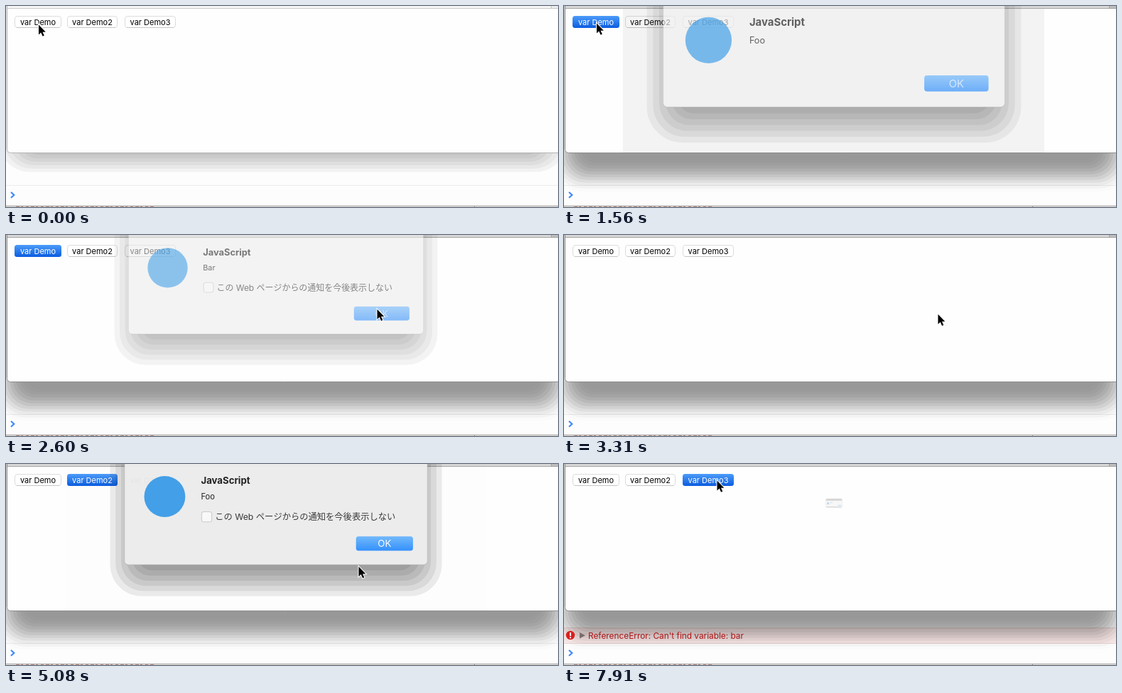
Write an HTML page with a canvas that moves like this. It is 777x284 px and loops after 8000 ms.

```html
<!DOCTYPE html>
<html lang="ja">
<head>
<meta charset="utf-8">
<title>var demo</title>
<style>
  html, body { margin: 0; width: 100%; height: 100%; overflow: hidden; background: #fdfdfd; }
  canvas { display: block; width: 777px; height: 284px; }
</style>
</head>
<body>
<canvas id="stage" width="777" height="284"></canvas>
<script>
const ctx = document.getElementById('stage').getContext('2d');
const W = 777, H = 284, LOOP = 8000;
const FONT = 'Inter, "Noto Sans CJK JP", "Noto Sans CJK", sans-serif';
const ACTIVATE = 710, ERROR = 5780;

const BUTTONS = [
  { label: 'var Demo', x: 12, w: 66, on: 1240, off: 3310 },
  { label: 'var Demo2', x: 86, w: 71, on: 4640, off: ERROR },
  { label: 'var Demo3', x: 167, w: 72, on: 7820, off: LOOP }
];

const DIALOGS = [
  { message: 'Foo', open: 1412, press: 2240, close: 2503 },
  { message: 'Bar', open: 2503, press: 3040, close: 3310, checkbox: true },
  { message: 'Foo', open: 4800, press: 5610, close: ERROR, checkbox: true },
  { message: 'Foo', open: 7906, press: LOOP, close: LOOP + 100 }
];

// The pointer rests between these moves.
const POINTER_START = { x: 46, y: 26.5 };
const POINTER_MOVES = [
  { start: 200, end: 270, x: 46, y: 24.5 },
  { start: 1560, end: 2160, x: 522.5, y: 105 },
  { start: 2600, end: 2950, x: 526.5, y: 112 },
  { start: 3860, end: 4550, x: 129.5, y: 25 },
  { start: 4810, end: 5080, x: 496.5, y: 145 },
  { start: 5080, end: 5610, x: 543.5, y: 117.5 },
  { start: 6770, end: 7640, x: 215.5, y: 23.5 }
];

const clamp = k => Math.min(1, Math.max(0, k));
const smooth = k => k * k * (3 - 2 * k);
const mix = (a, b, k) => a + (b - a) * k;

// Damped spring with one visible overshoot.
const popScale = ms => 1 - Math.exp(-ms / 95) * Math.cos(Math.PI * ms / 200);
const popOpacity = ms => clamp(0.35 + ms / 450);

function rect(x, y, w, h, fill) {
  ctx.fillStyle = fill;
  ctx.fillRect(x, y, w, h);
}

function box(x, y, w, h, r, fill, stroke) {
  ctx.beginPath();
  ctx.roundRect(x, y, w, h, r);
  ctx.fillStyle = fill;
  ctx.fill();
  if (stroke) {
    ctx.strokeStyle = stroke;
    ctx.lineWidth = 1;
    ctx.stroke();
  }
}

function circle(x, y, r, fill) {
  ctx.beginPath();
  ctx.arc(x, y, r, 0, 2 * Math.PI);
  ctx.fillStyle = fill;
  ctx.fill();
}

function text(string, x, middle, size, color, { align = 'left', weight = 400 } = {}) {
  ctx.font = `${weight} ${size}px ${FONT}`;
  ctx.textAlign = align;
  ctx.fillStyle = color;
  ctx.fillText(string, x, middle + size * 0.364);
}

function vertical(top, height, from, to) {
  const gradient = ctx.createLinearGradient(0, top, 0, top + height);
  gradient.addColorStop(0, from);
  gradient.addColorStop(1, to);
  return gradient;
}

function outside(x, y, w, h, draw) {
  ctx.save();
  ctx.beginPath();
  ctx.rect(-9999, -9999, 19999, 19999);
  ctx.roundRect(x, y, w, h, 5);
  ctx.clip('evenodd');
  draw();
  ctx.restore();
}

// Banded drop shadow: nested rounded shapes from the outer to the inner reach.
function shadow(x, y, w, h, { side, drop, bands, strength }) {
  outside(x, y, w, h, () => {
    for (let i = 0; i < bands; i++) {
      const k = i / (bands - 1);
      const s = mix(...side, k), d = mix(...drop, k);
      box(x - s, y - 60, w + 2 * s, h + 60 + d, 44 - 24 * k, `rgba(0,0,0,${strength(k)})`);
    }
  });
}

const ACTIVE_SHADOW = { side: [21, -25], drop: [54.5, 10], bands: 12, strength: k => 0.01 + 0.055 * Math.sin(Math.PI * k) };
const INACTIVE_SHADOW = { side: [12, -25], drop: [27, 3], bands: 6, strength: () => 0.045 };
const DIALOG_SHADOW = { side: [20, -18], drop: [44, 8], bands: 6, strength: () => 0.078 };

function drawConsole(t) {
  rect(0, 0, W, H, '#fdfdfd');
  rect(0, 253, W, 1, '#ececec');
  if (t >= ERROR) {
    rect(0, 231, W, 23, '#efd5d5');
    rect(0, 232, W, 21, '#fdebeb');
  }
}

function drawConsoleText(t) {
  if (t >= ERROR) {
    circle(9, 242, 6.2, '#d8201f');
    rect(8, 238, 2, 5, '#fff');
    rect(8, 244.3, 2, 2, '#fff');
    ctx.fillStyle = '#786c6c';
    ctx.fill(new Path2D('M22 238 L30 242.3 L22 246.6 Z'));
    text("ReferenceError: Can't find variable: bar", 34, 242.6, 11.85, '#ae1616');
  }
  ctx.strokeStyle = '#438bf7';
  ctx.lineWidth = 2.2;
  ctx.stroke(new Path2D('M7 263 L11.3 267 L7 271'));

  rect(0, 282, W, 1, '#a9a6a4');
  rect(0, 283, W, 1, '#e6e2df');
  for (let x = 14; x < 208; x += 7) rect(x, 283, 3 + x % 3, 1, '#b58d87');
  rect(659, 283, 1, 1, '#8a8a8a');
}

function drawWindow(t) {
  const active = t >= ACTIVATE;
  shadow(1.5, -20, 776, 227.5, active ? ACTIVE_SHADOW : INACTIVE_SHADOW);
  box(1.5, -20, 790, 227.5, 5, '#fefefe', active ? '#8e8e8e' : '#b4b4b4');
  rect(2, 0, W, 3, active ? '#d6d6d6' : '#f5f5f5');
  rect(2, 3, W, 1, active ? '#a8a8a8' : '#cbcbcb');
  rect(768, 0, 9, 3, active ? '#bdbdbd' : '#ececec');
  rect(767, 0, 1, 3, t >= 890 ? '#a2a2a2' : '#c4c4c4');

  for (const { label, x, w, on, off } of BUTTONS) {
    const pressed = t >= on && t < off;
    if (pressed) {
      box(x, 14, w, 17, 3.5, vertical(14, 17, '#4c9cf9', '#0b5ce0'));
    } else {
      box(x + 0.5, 14.5, w - 1, 16, 3.5, '#fff', '#dcdcdc');
      rect(x + 3, 30, w - 6, 1, '#c6c6c6');
    }
    text(label, x + w / 2, 22.8, 11, pressed ? '#fff' : '#000', { align: 'center' });
  }
}

function drawDialog({ message, open, press, close, checkbox }, t) {
  if (t < open || t >= close) return;
  const scale = popScale(t - open);
  const fading = t >= close - 85;
  const top = checkbox ? 23.1 : 26.2;
  const buttonTop = checkbox ? 101.5 : 92.6;
  const body = [170, -20, 420, checkbox ? 160.9 : 151.7];

  ctx.save();
  ctx.translate(380, 56);
  ctx.scale(scale, scale);
  ctx.translate(-380, -56);
  outside(...body, () => {
    ctx.resetTransform();
    rect(83, 4, 593, 203, `rgba(0,0,0,${Math.max(0, 0.3 * (scale - 1))})`);
  });
  ctx.globalAlpha = popOpacity(t - open) * (fading ? 0.5 : 1);
  shadow(...body, DIALOG_SHADOW);
  box(...body, 5, '#ececec', 'rgba(0,0,0,.15)');

  circle(225.8, top + 23.1, 28.5, '#3f9ee8');
  text('JavaScript', 276, top + 0.5, 13, '#1c1c1c', { weight: 700 });
  text(message, 276, top + 23.1, 11, '#1c1c1c');
  if (checkbox) {
    box(277, 67.3, 14, 14, 3, '#f8f8f8', '#cacaca');
    text('この Web ページからの通知を今後表示しない', 295.5, 74.4, 12.1, '#333');
  }
  const [light, dark] = t >= press ? ['#3f8ff5', '#0b5ce0'] : ['#6fb8fc', '#2f8efd'];
  box(491, buttonTop, 79, 20, 3.5, vertical(buttonTop, 20, light, dark));
  text('OK', 530.5, buttonTop + 10, 13, '#fff', { align: 'center' });
  ctx.restore();
}

function drawPointer(t) {
  let { x, y } = POINTER_START;
  for (const move of POINTER_MOVES) {
    const k = smooth(clamp((t - move.start) / (move.end - move.start)));
    x = mix(x, move.x, k);
    y = mix(y, move.y, k);
  }
  const arrow = new Path2D('M0 0 V14 L3.2 11 L5.6 16.3 L7.8 15.3 L5.5 10.2 H9.8 Z');
  ctx.save();
  ctx.translate(x, y);
  ctx.strokeStyle = '#fff';
  ctx.lineWidth = 2;
  ctx.stroke(arrow);
  ctx.fillStyle = '#000';
  ctx.fill(arrow);
  ctx.restore();
}

function frame() {
  const t = performance.now() % LOOP;
  drawConsole(t);
  drawWindow(t);
  drawConsoleText(t);
  DIALOGS.forEach(dialog => drawDialog(dialog, t));
  drawPointer(t);
  requestAnimationFrame(frame);
}
frame();
</script>
</body>
</html>
```
